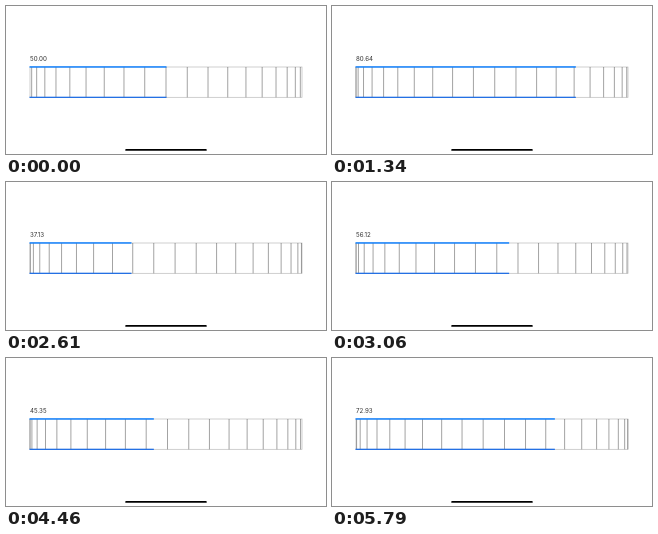
An HTML page for the animation above (5.86 s loop, 320 by 148 pixels).

```html
<!DOCTYPE html>
<html lang="en">
<head>
<meta charset="utf-8">
<style>
  html, body { margin: 0; width: 100%; height: 100%; overflow: hidden; background: #fff; }
  svg { display: block; width: 100vw; height: 100vh; }
  text { font: 6.2px Inter, "Liberation Sans", sans-serif; fill: #333; }
</style>
</head>
<body>
<svg viewBox="0 0 320 148">
  <rect x="24" y="61" width="272" height="30.3" fill="none" stroke="#bbb" stroke-width=".7"/>
  <path id="ticks" fill="none" stroke="#333" stroke-width=".45"/>
  <rect id="top" x="23.5" y="60.2" height="1.5" fill="#1583ff"/>
  <rect id="bottom" x="23.5" y="90.7" height="1.3" fill="#2470e4"/>
  <text id="label" x="24" y="54.9"></text>
  <rect x="119.2" y="142.95" width="81.6" height="1.9" rx=".95" fill="#000"/>
</svg>
<script>
const LOOP = 5860, START = 780, STEP = 111;
const LEFT = 24, WIDTH = 272, RADIUS = WIDTH / 2, CENTER = LEFT + RADIUS;
const TICK_ANGLE = 9, DEGREES_PER_UNIT = 1.8;
const [ticks, topBar, bottomBar, label] =
  ["ticks", "top", "bottom", "label"].map(id => document.getElementById(id));

// Drag path: update step, slider value
const keys = [
  [-1, 50], [5, 80.64], [12, 25.25], [20, 56.12], [23, 66],
  [26, 61.6], [31, 45.5], [33, 45.35], [37, 45], [45, 72.93]
];

const rate = (a, b) => (b[1] - a[1]) / (b[0] - a[0]);

// Harmonic slopes keep the curve from overshooting its turning points
function slope(i) {
  if (i === 0 || i === keys.length - 1) return 0;
  const before = rate(keys[i - 1], keys[i]), after = rate(keys[i], keys[i + 1]);
  return before * after > 0 ? 2 * before * after / (before + after) : 0;
}

function valueAt(step) {
  const i = Math.max(1, keys.findIndex(key => key[0] >= step));
  const [s0, v0] = keys[i - 1], [s1, v1] = keys[i];
  const span = s1 - s0, u = (step - s0) / span, w = 1 - u;
  return v0 * w * w * (1 + 2 * u) + v1 * u * u * (3 - 2 * u)
    + span * u * w * (slope(i - 1) * w - slope(i) * u);
}

function draw(value) {
  const turn = (value - 50) * DEGREES_PER_UNIT;
  const offset = ((turn % TICK_ANGLE) + TICK_ANGLE) % TICK_ANGLE;
  let path = "";
  for (let angle = offset - 90; angle < 90; angle += TICK_ANGLE) {
    if (angle === -90) continue;
    const x = CENTER + RADIUS * Math.sin(angle * Math.PI / 180);
    path += `M${x.toFixed(2)} 61V91.3`;
  }
  ticks.setAttribute("d", path);
  for (const bar of [topBar, bottomBar]) bar.setAttribute("width", WIDTH * value / 100 + 1);
  label.textContent = value.toFixed(2);
}

function frame() {
  const time = performance.now() % LOOP;
  const step = Math.floor((time - START) / STEP);
  draw(valueAt(Math.min(45, Math.max(-1, step))));
  requestAnimationFrame(frame);
}
frame();
</script>
</body>
</html>
```
